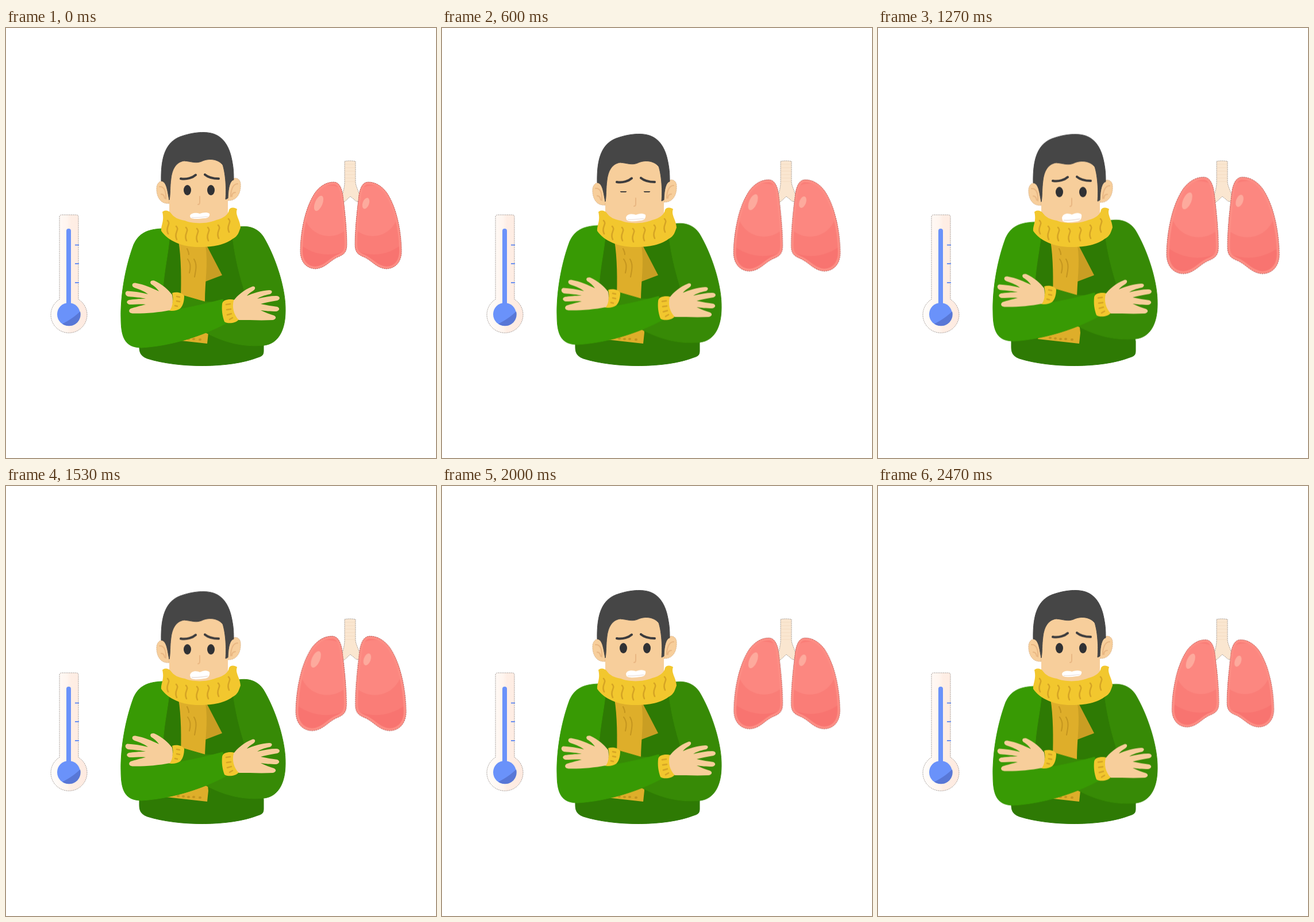
Recreate the animation shown at these times as an HTML page without scripts. Size 748 by 748 pixels, loop 2540 ms.

```html
<!DOCTYPE html>
<html lang="en">
<head>
<meta charset="utf-8">
<title>Chills</title>
<style>
  html, body { margin: 0; width: 100%; height: 100%; overflow: hidden; background: #fff; }
  svg { display: block; width: 100vw; height: 100vh; }

  .arms, .lungs, .head, .brows, .eye, .mouth { animation: 2540ms linear infinite; }
  .arms { animation-name: shrug; }
  .lungs { animation-name: breathe; transform-origin: 600px 343px; }
  .head { animation-name: nod; }
  .brows { animation-name: frown; }
  .eye { animation-name: blink; transform-origin: 0 282px; }
  .mouth { animation-name: chatter; transform-origin: 337px 326.5px; }

  @keyframes shrug { 50% { transform: translateY(-11.4px); } }
  @keyframes breathe { 50% { transform: scale(1.113); } }
  @keyframes nod { 0%, 79%, 100% { transform: none; } 38% { transform: translateY(4.7px); } }
  @keyframes frown { 0%, 45%, 100% { transform: none; } 23%, 79% { transform: translateY(3px); } }
  @keyframes blink { 0%, 39%, 100% { transform: none; } 22.5% { transform: scaleY(.03); } }
  @keyframes chatter { 50% { transform: scaleY(1.5); } }

  .line { fill: none; stroke-linecap: round; stroke-linejoin: round; }
  .skin { fill: #f7ce9b; }
  .crease { stroke: #e9b783; stroke-width: 2; }
  .dark { fill: #2e7a04; stroke: #2e7a04; }
  .front { fill: #389a04; stroke: #389a04; }
  .back { fill: #378a06; stroke: #378a06; }
  .wool { fill: #f2c72e; }
  .rib { stroke: #d5a425; stroke-width: 2.6; }
  .hairline { stroke: #8a817b; stroke-width: .8; stroke-dasharray: 2 1.2; }
</style>
</head>
<body>
<svg viewBox="0 0 748 748">
  <defs>
    <linearGradient id="glass">
      <stop offset="0" stop-color="#fffdfb"/>
      <stop offset=".45" stop-color="#fff5ef"/>
      <stop offset=".55" stop-color="#feeee5"/>
      <stop offset="1" stop-color="#feeae0"/>
    </linearGradient>
    <path id="lobe" d="M569 268C580 267 585 280 586.500 295C589 315 592.500 345 593 375C593 391 588 394 576 399C562 406 555 418 538 419C520 418 511 404 512 385C513 350 521 311 538 286C548 273 559 268 569 268Z"/>
    <clipPath id="lobeClip"><use href="#lobe"/></clipPath>
    <g id="lung">
      <g clip-path="url(#lobeClip)">
        <use href="#lobe" fill="#f87470"/>
        <circle cx="560" cy="319" r="75" fill="#fa7d77"/>
        <circle cx="562" cy="318" r="44" fill="#fc8780"/>
        <use href="#lobe" fill="none" stroke="#fd8d84" stroke-width="8"/>
      </g>
      <use href="#lobe" fill="none" stroke="#a2544f" stroke-width=".8" stroke-dasharray="2 1.4"/>
    </g>
    <path id="wiggle" class="line rib" d="M0 0C7 6-5 11 1 23"/>
  </defs>

  <g id="thermometer">
    <path class="hairline" fill="url(#glass)" d="M93 329Q93 325 97 325H122Q126 325 126 329V472A31.5 31.5 0 1 1 93 472Z"/>
    <path class="line" d="M109 353V490" stroke="#6a92fa" stroke-width="8"/>
    <circle cx="109" cy="498" r="20" fill="#6a92fa"/>
    <path d="M129 493A20 20 0 0 1 98 514.500C108 510 120 502 129 493Z" fill="#5877d6"/>
    <path d="M120 377.500h7m-7 32.500h7m-7 33h7" stroke="#6a8ff0" stroke-width="2"/>
  </g>

  <g id="chest">
    <path class="hairline" fill="#fae6d0" d="M589 232Q598 230 608 232V268C609 280 616 284 616 301L610 302L599 293L588 303L582 303C584 290 589 282 589 268Z"/>
    <path d="M590 237h17m-17 6h17m-17 6h17m-17 6h17m-17 6h17m-17 6h17" stroke="#f3dcc1" stroke-width="1.200"/>
    <g class="lungs">
      <use href="#lung"/>
      <use href="#lung" transform="translate(1200) scale(-1 1)"/>
      <g fill="#fdaa9d">
        <ellipse cx="544" cy="305" rx="6.500" ry="14" transform="rotate(23 544 305)"/>
        <ellipse cx="626" cy="305" rx="5.500" ry="10" transform="rotate(20 626 305)"/>
      </g>
    </g>
  </g>

  <g id="man">
    <path class="dark" d="M268 352H405L448 545V562C448 569 445 571 438 573C390 592 300 592 246 575C235 571 232 565 232 555V540Z"/>

    <path fill="#c99e23" d="M335 376L350 380L376 430L347 441Z"/>
    <path fill="#deae2a" d="M300 370C315 378 335 380 347 378C352 410 346 440 346 476L352 530L350 549L278 541L304 470C305 440 305 400 300 370Z"/>
    <path class="line rib" style="stroke:#c4951f;stroke-width:2" d="M316 402C322 410 321 418 319 426M327 402C333 412 330 422 328 433M315 384q3 6 3 10"/>
    <path class="line rib" style="stroke:#c4951f;stroke-width:4" d="M299 539h1m8 1h1m8 1h1m8 0h1m10 1h1"/>

    <g class="head">
      <g class="skin">
        <path class="hairline" style="stroke:#cda67c" d="M284 274C278 263 264 263 262 277C261 292 268 307 284 305Z"/>
        <path class="hairline" style="stroke:#cda67c" d="M386 270C392 258 407 258 408 271C409 288 401 301 386 300Z"/>
        <path d="M284 228H386V345H284Z"/>
      </g>
      <path class="line crease" d="M267 276C275 275 279 284 278 297M270 289q5 0 6 7M403 271C395 271 391 281 391 293M399 286q-6 0-6 7"/>
      <path fill="#464646" stroke="#464646" d="M284 299C281 285 280 267 270 266C269 220 280 198 303 189C325 181 345 180 357 183C379 188 389 208 393 230C396 245 396 254 396 264Q387 266 386 296L382 298C384 275 381 250 377 238C367 226 350 227 340 232C330 236 322 232 310 231C296 233 289 245 287 262C285 276 286 290 284 299Z"/>
      <path class="line brows" d="M304 262C315 264 325 260 330 255.500M346 255C352 260 361 262 370 262" stroke="#3a3a3c" stroke-width="4"/>
      <g fill="#303134">
        <ellipse class="eye" cx="315.500" cy="282" rx="6.500" ry="9"/>
        <ellipse class="eye" cx="356.500" cy="282" rx="6.500" ry="9"/>
      </g>
      <path class="line crease" d="M337 293V303Q337 307 334 307"/>
      <g class="mouth">
        <path fill="#fff" d="M320 327C321 321 332 321 337 323C343 321 350 320 354 323C355 328 351 331 345 331C336 332 325 333 321 330Z"/>
        <path class="line" d="M323 329.500C333 330 343 329 351 328" stroke="#e9dcd7"/>
      </g>
    </g>

    <g class="arms">
      <path class="back" d="M405 346C425 343 441 350 450 367C470 402 487 455 486 492C486 525 474 549 449 552C410 556 375 545 346 529L300 515V463L345 476L414 480V455C403 420 397 390 393 356Z"/>
      <path class="front" d="M272 349C246 350 231 357 222 377C206 420 199 470 200 505C200 540 208 556 236 556C285 553 340 537 384 513L377 472C340 482 310 488 285 492L273 456C275 420 283 390 285 358Z"/>

      <path class="wool" d="M289 461C297 458 308 461 310 466C310 475 308 483 303 488C297 492 288 493 283 491C290 482 292 471 289 461Z"/>
      <path class="line rib" d="M297 467l5 1m-5 7l5 1m-8 7l4 1"/>
      <path class="skin" d="M289 464C282 455 272 446 258 439.500C252 438 249 442 253 446C260 450 264 455 266 458C255 453 240 446 225 443.500C218 443 218 450 224 452C234 455 242 459 247 463C235 460 222 458 211 457.500C206 459 207 465 212 467C224 468 236 469 243 471C232 471 221 472 214 473C208 475 210 480 215 481C226 481 236 480 243 481C234 483 224 486 217 488C212 491 214 496 220 496.500C240 497 265 495 285 491C290 485 291 474 289 464Z"/>

      <path class="wool" d="M376 480C377 472 390 471 397 473C396 486 398 498 405 507C400 514 385 515 380 511C376 500 375 490 376 480Z"/>
      <path class="line rib" d="M383 481l7-1m-6 10l7-1m-6 10l7-2m-3 10l5-3"/>
      <path class="skin" d="M396 474C402 466 414 455 428 450C434 448 435 454 430 457C425 460 421 463 419 466C430 461 444 457 458 456C464 456 464 461 459 463C449 465 441 468 437 471C449 468 460 466 470 466C477 466 478 472 472 474C460 476 450 478 443 480C453 482 464 484 472 485C477 487 476 492 470 493C460 493 450 492 443 491C451 495 459 498 466 500C471 502 470 507 464 508C445 509 424 508 405 508C396 499 393 486 396 474Z"/>
    </g>

    <path class="wool" d="M272 320C276 316 282 317 286 321C292 330 300 333 311 335C325 341 350 341 366 334C378 331 387 325 388 316C391 311 398 312 402 315C398 325 407 333 408 347C405 355 404 362 394 367C378 379 355 381 335 381C308 381 282 371 270 353C269 344 276 336 272 320Z"/>
    <use href="#wiggle" x="281" y="335"/>
    <use href="#wiggle" x="296" y="345"/>
    <use href="#wiggle" x="313" y="347"/>
    <use href="#wiggle" x="332" y="349"/>
    <use href="#wiggle" x="351" y="347"/>
    <use href="#wiggle" x="369" y="343"/>
    <use href="#wiggle" x="387" y="332"/>
  </g>
</svg>
</body>
</html>
```
